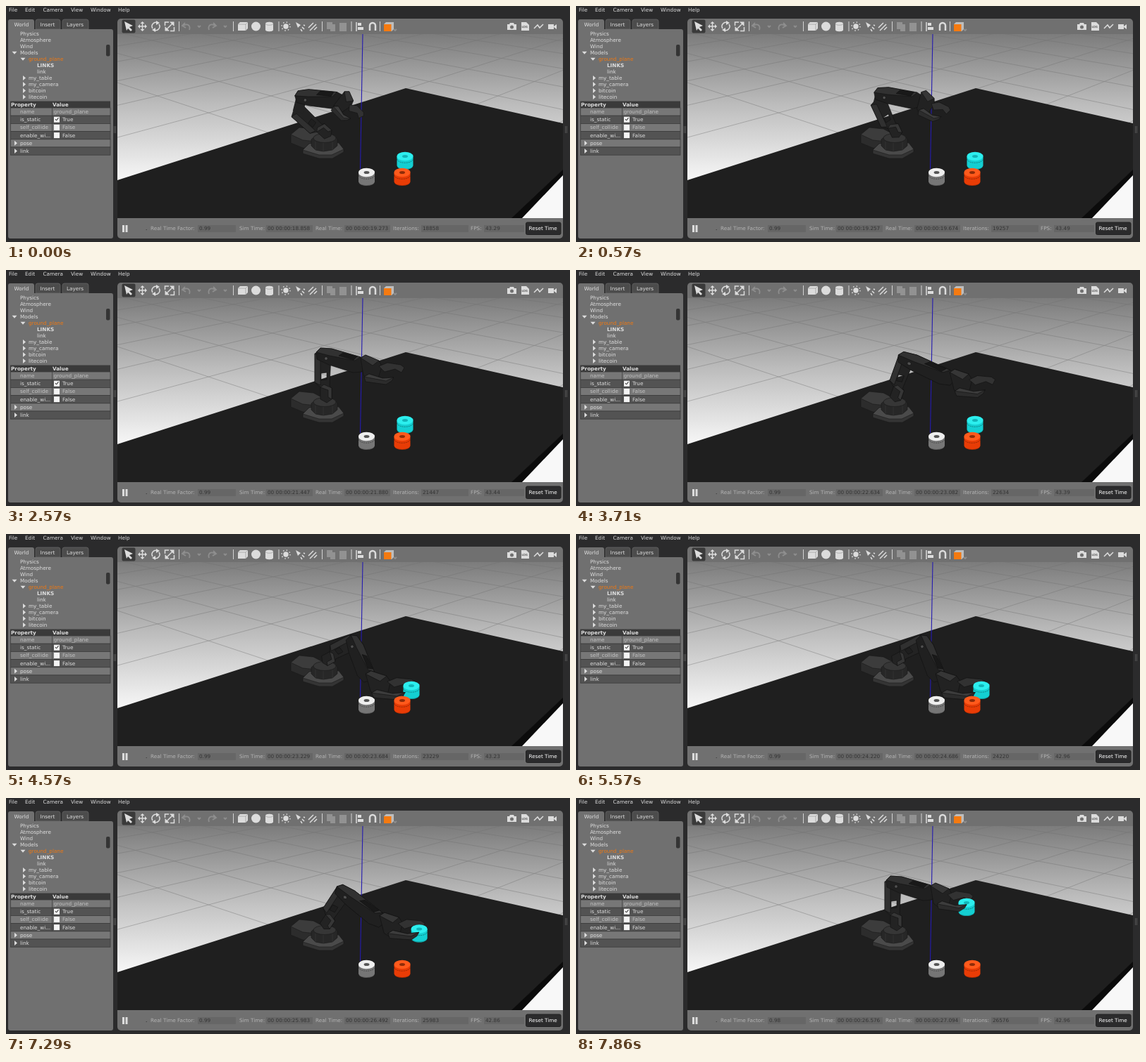
An HTML page that plays this animation: 800 by 336 pixels, repeating every 8000 ms.

```html
<!DOCTYPE html>
<html lang="en">
<head>
<meta charset="utf-8">
<title>Robot arm simulation</title>
<style>
html, body { margin: 0; width: 100%; height: 100%; overflow: hidden; background: #2b2b2c; }
svg { display: block; width: 100%; height: 100%; }
text { font: 7.25px "DejaVu Sans", sans-serif; fill: #dedede; white-space: pre; }
.bold { font-weight: bold; }
.orange { fill: #ee7812; }
.black { fill: #151515; }
.dim { fill: #b4b4b4; }
.faint { fill: #c2c2c2; }
.value { fill: #343434; }
.icon { fill: #dcdcdc; }
.line { fill: none; stroke: #dcdcdc; stroke-width: 1.5; }
.muted { fill: none; stroke: #8e8e8e; stroke-width: 1.8; }
</style>
</head>
<body>
<svg viewBox="0 0 800 336" preserveAspectRatio="none">
  <defs>
    <linearGradient id="ground" x1="0" y1="0" x2="0" y2="1">
      <stop offset="0" stop-color="#7c7c7c"/>
      <stop offset=".38" stop-color="#bcbcbc"/>
      <stop offset=".78" stop-color="#f5f5f5"/>
      <stop offset="1" stop-color="#fff"/>
    </linearGradient>
    <clipPath id="view"><path d="M158 40H790V302H158Z"/></clipPath>
    <g id="coin">
      <path d="M-11.5-6V7C-11 15 11 15 11.5 7V-6Z"/>
      <path d="M-11.5-2C-10 5 10 5 11.5-2" fill="none" stroke="#000" stroke-opacity=".35" stroke-dasharray="2 1"/>
      <path d="M-11.5 8C-10 14 10 14 11.5 8" fill="none" stroke="#000" stroke-opacity=".25"/>
    </g>
    <path id="chevron" class="muted" d="M-2-1L0 1L2-1"/>
  </defs>

  <g id="menu"></g>
  <path d="M42 33V22q0-3 3-3H74q3 0 3 3V33ZM80 33V22q0-3 3-3H114q3 0 3 3V33Z" fill="#4c4c4c" stroke="#696969" stroke-width=".7"/>
  <path d="M3 33V22q0-3 3-3H37q3 0 3 3V33H149q3 0 3 3V328q0 3-3 3H6q-3 0-3-3Z" fill="#707070"/>
  <rect x="142" y="55" width="5.5" height="16.500" rx="2" fill="#343434"/>
  <g id="rows"></g>
  <g id="labels"></g>

  <rect x="158" y="18" width="632" height="313" rx="5" fill="#707070"/>
  <g id="toolbar">
    <rect x="164.500" y="19.500" width="19" height="19" rx="2" fill="#3a3a3a"/>
    <path class="icon" d="M168 22L180 28L175 30L179 34L177 36L173 32L171 35Z"/>
    <path class="line" d="M188 29H199M193.500 23V35"/>
    <path class="icon" d="M193.500 22l3 3h-6ZM193.500 36l3-3h-6ZM187 29l3-3v6ZM200 29l-3-3v6Z"/>
    <path class="line" d="M208 32A5.500 5.500 0 0 1 215 24M217 26A5.500 5.500 0 0 1 210 34"/>
    <path class="icon" d="M213 21l5 3l-5 3ZM212 37l-5-3l5-3Z"/>
    <path class="line" d="M225.500 28V23H231M238.500 30V35.500H233M228 33L236 25"/>
    <path class="icon" d="M232 22.500h6.500v6.500ZM225.500 29v6.500h6.500Z"/>
    <path class="muted" d="M251 28C258 24 262 28 260 34M254 24L250 28L255 31M297 28C290 24 286 28 288 34M294 24L298 28L293 31"/>
    <use href="#chevron" x="274" y="29"/><use href="#chevron" x="311" y="29"/>
    <path d="M245.500 22V36M322.500 22V36M387 22V36M448.500 22V36M490 22V36M530.500 22V36" stroke="#d2d2d2"/>
    <path class="icon" d="M329 26l3-3h11v9l-3 3H329Z"/>
    <path d="M329 26H340V35M340 26l3-3" fill="none" stroke="#999" stroke-width=".7"/>
    <circle class="icon" cx="354.500" cy="29" r="6.500"/>
    <path class="icon" d="M368 25C368 22 379 22 379 25V34C379 37 368 37 368 34Z"/>
    <path d="M368 25C368 28 379 28 379 25" fill="none" stroke="#999" stroke-width=".7"/>
    <circle class="icon" cx="397" cy="29" r="3.700"/>
    <circle class="line" cx="397" cy="29" r="6" stroke-dasharray="1.500 3.200"/>
    <path class="icon" d="M411 23l7 4l-4 4Z"/>
    <path class="line" d="M418 33l2 3M420 30l3 3M422 27l2 1"/>
    <path class="line" d="M429 31L436 24M431 35L440 26M437 34L441 30"/>
    <path d="M455 23H463V33H455ZM460 26H467V36H460ZM473 24H483V36H473Z" fill="#929292"/>
    <path class="line" d="M497 23V36"/><path class="icon" d="M499 24h5v4h-5ZM499 30h8v4h-8Z"/>
    <path class="line" d="M516 35V28A4 4 0 0 1 524 28V35" style="stroke-width:2.500"/>
    <path d="M536 26l3-3H550V33l-3 3H536Z" fill="#bdbdbd"/>
    <rect x="536" y="26" width="10.500" height="10" fill="#f57a10"/>
    <use href="#chevron" x="552" y="34"/>
    <path class="icon" d="M711 26h3l1-2h5l1 2h3v8H711Z"/><circle cx="717.500" cy="30" r="2.500" fill="#707070"/>
    <path class="icon" d="M731 23H738L742 27V35H731Z"/>
    <text x="731.500" y="31" class="black" style="font-size:4px">LOG</text>
    <path class="line" d="M749 32L754 27L757 31L762 26"/>
    <path class="icon" d="M769 26h8v7h-8ZM777 29l4-3v7l-4-3Z"/>
  </g>

  <g clip-path="url(#view)">
    <rect x="158" y="40" width="632" height="262" fill="url(#ground)"/>
    <path id="grid" stroke="#707070" stroke-width=".7" opacity=".6"/>
    <path d="M790 233V302H717Z" fill="#f8f8f8"/>
    <path d="M158 248L567 117L790 167V234L718 302H158Z" fill="#1f1f1f"/>
    <path d="M790 233L717 302H732L790 241Z" fill="#0b0b0b"/>

    <g id="base" stroke="#1a1a1a" stroke-width=".6">
      <path d="M404 183L416 173L436 175L453 184L446 203L421 202L404 195Z" fill="#2c2c2c"/>
      <path d="M404 183L416 173L436 175L453 184L440 193L421 191Z" fill="#3c3c3c"/>
      <path d="M421 205L430 196L453 192L472 195L479 204V208L463 217H444L421 210Z" fill="#343434"/>
      <path d="M421 205L430 196L453 192L472 195L479 204L462 212H444Z" fill="#4a4a4a"/>
      <path d="M433 190L440 184H464L470 189V199L463 205L450 207L439 205L433 199Z" fill="#272727"/>
      <path d="M439 193V205M450 195V207M463 193V205" stroke="#3a3a3a"/>
      <ellipse cx="452" cy="188" rx="16" ry="6.500" fill="#363636"/>
    </g>

    <path d="M506 40L502.500 232" stroke="#251bb0" stroke-width="1.100"/>
    <use href="#coin" x="511.500" y="243" fill="#767676"/>
    <ellipse cx="511.500" cy="237" rx="11.500" ry="6.200" fill="#eee"/>
    <ellipse cx="511.500" cy="237" rx="4" ry="2" fill="#555"/>

    <g stroke="#111" stroke-width=".6">
      <g id="upper">
        <path d="M438 119L446 115L461 123L459 165L462 168V184L455 189L446 184V167L438 160ZM447 147V157L455 156V146Z" fill="#232323" fill-rule="evenodd"/>
        <path d="M438 119L446 122V164L438 160Z" fill="#303030"/>
        <path d="M446 167L451 163L462 168V184L457 181V171Z" fill="#363636"/>
      </g>
      <path id="elbow" stroke="#232323" stroke-width="15"/>
      <g id="fore">
        <path d="M440 117L446 111L462 112L503 124L512 131L505 145L492 146L458 135L441 127Z" fill="#202020"/>
        <path d="M440 117L446 111L462 112L503 124L495 129L459 122Z" fill="#313131"/>
        <path d="M472 122L478 118L498 123L493 128Z" fill="#191919"/>
        <circle cx="454" cy="126" r="2.300" fill="#505050"/>
      </g>
      <g id="wrist">
        <path d="M503 125L510 121L529 129L533 137L528 154L516 157L507 150Z" fill="#222"/>
        <path d="M503 125L510 121L529 129L520 136Z" fill="#363636"/>
        <path id="backJaw" d="M526 138L538 133L557 136L562 140L558 147L549 142L534 146Z" fill="#323232"/>
      </g>
    </g>

    <g id="cyan">
      <use href="#coin" fill="#14cfd2"/>
      <ellipse cy="-6" rx="11.500" ry="6.200" fill="#2ceeee"/>
      <ellipse cy="-6" rx="4" ry="2" fill="#12b4b8"/>
    </g>
    <g id="hand" stroke="#111" stroke-width=".6">
      <g id="frontJaw">
        <path d="M515 150L522 146L541 152L557 151L554 156L546 161L517 157Z" fill="#2c2c2c"/>
        <path d="M515 150L522 146L541 152L557 151L546 156Z" fill="#3c3c3c"/>
      </g>
    </g>
    <use href="#coin" x="562" y="243" fill="#e83c06"/>
    <ellipse cx="562" cy="237" rx="11.500" ry="6.200" fill="#ff5a1c"/>
    <ellipse cx="562" cy="237" rx="4" ry="2" fill="#8f2c08"/>
  </g>

  <path class="icon" d="M165 312H168V322H165ZM169.500 312H172.500V322H169.500Z"/>
  <path d="M272 312H326V322H272ZM369 312H435V322H369ZM480 312H545V322H480ZM589 312H656V322H589ZM678 312H735V322H678Z" fill="#666"/>
  <g id="status"></g>
  <rect x="737.500" y="308" width="49.500" height="17.500" rx="2" fill="#2b2b2c" stroke="#222"/>
  <text x="741.500" y="319.300" style="fill:#fff">Reset Time</text>
  <path d="M153.500 171V181M155.500 171V181M793.500 171V181M795.500 171V181" stroke="#666" stroke-width=".7"/>
</svg>
<script>
const $ = id => document.getElementById(id);
const SVG = "http://www.w3.org/2000/svg";

function add(parent, tag, attrs, content = "") {
  const el = document.createElementNS(SVG, tag);
  for (const name in attrs) el.setAttribute(name, attrs[name]);
  el.textContent = content;
  return $(parent).appendChild(el);
}
const label = (parent, x, y, content, cls = "") => add(parent, "text", { x, y, class: cls }, content);

// Menus, tabs and tree
[[4, "File"], [27, "Edit"], [52.5, "Camera"], [92, "View"], [120, "Window"], [159, "Help"]]
  .forEach(([x, name]) => label("menu", x, 8, name));
[[11.5, "World"], [48.5, "Insert"], [86, "Layers"]].forEach(([x, name]) => label("labels", x, 28.5, name));

function arrow(x, y, open) {
  add("labels", "path", { class: "icon", d: open ? `M${x - 3.5} ${y - 2}h7l-3.5 4Z` : `M${x - 2} ${y - 3.5}v7l4-3.5Z` });
}
[[20, "Physics"], [20, "Atmosphere"], [20, "Wind"], [20, "Models"], [32, "ground_plane", "orange"],
 [44, "LINKS", "bold"], [44, "link"], [32, "my_table"], [32, "my_camera"], [32, "bitcoin"], [32, "litecoin"]]
  .forEach(([x, name, cls], i) => {
    const y = 42.3 + i * 8.98;
    label("labels", x, y, name, cls);
    if (i === 3 || i === 4) arrow(x - 8, y - 2.5, true);
    if (i > 6) arrow(x - 6, y - 2.7, false);
  });

// Property table
add("rows", "rect", { x: 6, y: 135.5, width: 142, height: 9.5, fill: "#3a3a3a" });
label("labels", 7, 143, "Property", "bold");
label("labels", 66, 143, "Value", "bold");
[["name", "ground_plane", "faint"], ["is_static", "True"], ["self_collide", "False", "faint"],
 ["enable_wi...", "False"], ["pose"], ["link"]].forEach(([name, value, cls], i) => {
  const y = 145 + i * 11.2, fill = i % 2 ? "#535353" : "#777";
  add("rows", "rect", { x: 6.5, y, width: 141.5, height: 11.2, fill, stroke: "#3c3c3c", "stroke-width": 0.8 });
  label("labels", 20, y + 8, name, cls);
  if (!value) return arrow(14, y + 5.5, false);
  if (i) add("labels", "rect", { x: 68, y: y + 1.5, width: 8, height: 8, fill: "#f4f4f4" });
  label("labels", i ? 80 : 67.5, y + 8, value, cls);
});
add("labels", "path", { d: "M70 161l1.500 2l3-4", fill: "none", stroke: "#111" });
add("labels", "path", { d: "M65.500 145V190", stroke: "#3c3c3c", "stroke-width": 0.7 });

// Ground grid: two fans of lines, evenly spaced along the top edge
const fan = (vx, vy, first, count) => Array.from({ length: count }, (_, i) => {
  const x = first + i * 110;
  return `M${vx} ${vy}L${vx + (x - vx) * 4} ${vy + (40 - vy) * 4}`;
}).join("");
$("grid").setAttribute("d", fan(1400, -150, 260, 9) + fan(-622, -150, -50, 9));

// Status bar
[[205, "Real Time Factor:"], [331, "Sim Time:"], [439, "Real Time:"], [549, "Iterations:"], [659, "FPS:"]]
  .forEach(([x, name]) => label("status", x, 319.3, name, "dim"));
label("status", 198, 319.3, ".", "black");
const [factor, simTime, realTime, iterations, fps] =
  [274, 371, 482, 591, 680].map(x => label("status", x, 319.3, "", "value"));

// Linear interpolation over rows of [position, ...values]
function sample(rows, at) {
  let i = 1;
  while (i < rows.length - 1 && at > rows[i][0]) i++;
  const a = rows[i - 1], b = rows[i];
  const p = Math.min(1, Math.max(0, (at - a[0]) / (b[0] - a[0])));
  return a.slice(1).map((v, k) => v + (b[k + 1] - v) * p);
}

// Each pose: elbow, root of the forearm, wrist, fingertip
const SHOULDER = [455, 180], ELBOW = [449, 122], WRIST = [510, 134], TIP = [560, 147];
const folded = [414, 151, 419, 131, 478, 131, 499, 160];
const upright = [...ELBOW, ...ELBOW, ...WRIST, ...TIP];
const leaning = [467, 128, 467, 128, 538, 154, 590, 164];
const lowering = [481, 138, 481, 138, 538, 185, 592, 195];
const reaching = [491, 154, 491, 154, 519, 208, 577, 219];
const armKeys = [
  [140, ...folded], [1140, ...upright], [3290, ...upright], [3710, ...leaning],
  [4150, ...lowering], [4570, ...reaching], [6900, ...reaching],
  [7200, ...lowering], [7500, ...leaning], [7800, ...upright]
];
const gripKeys = [[140, 1], [1140, 0], [1500, 0], [2000, 1], [5800, 1], [6300, 0.4]];
const coinKeys = [
  [4430, 566, 220], [4570, 575, 222], [5900, 575, 222], [6300, 577, 219],
  [6900, 577, 219], [7200, 587, 201], [7500, 584, 171], [7800, 554, 155]
];
// refresh count, simulated ms, real ms, fps
const counterKeys = [
  [0, 18858, 19273, 43.29], [6, 20054, 20477, 43.88], [13, 21447, 21880, 43.44], [19, 22634, 23082, 43.39],
  [27, 24220, 24686, 42.96], [34, 25587, 26091, 42.79], [39, 26576, 27094, 42.96]
];
const refreshKeys = [[0, 0], [1285, 6], [2571, 13], [3714, 19], [5571, 27], [6857, 34], [7857, 39]];

// Moves a limb drawn along home segment a-b onto segment c-d
function place(ids, a, b, c, d) {
  const angle = (p, q) => Math.atan2(q[1] - p[1], q[0] - p[0]) * 180 / Math.PI;
  const size = (p, q) => Math.hypot(q[0] - p[0], q[1] - p[1]);
  const move = `translate(${c}) rotate(${angle(c, d)}) scale(${size(c, d) / size(a, b)} 1) ` +
    `rotate(${-angle(a, b)}) translate(${-a[0]} ${-a[1]})`;
  ids.forEach(id => $(id).setAttribute("transform", move));
}

const clock = ms => "00 00:00:" + (Math.round(ms) / 1000).toFixed(3);

function draw(t) {
  const pose = sample(armKeys, t);
  const [elbow, root, wrist, tip] = [0, 2, 4, 6].map(i => pose.slice(i, i + 2));
  place(["upper"], SHOULDER, ELBOW, SHOULDER, elbow);
  $("elbow").setAttribute("d", `M${elbow}L${root}`);
  place(["fore"], ELBOW, WRIST, root, wrist);
  place(["wrist", "hand"], WRIST, TIP, wrist, tip);
  const [grip] = sample(gripKeys, t);
  $("backJaw").setAttribute("transform", `translate(${3 * grip} ${-grip})`);
  $("frontJaw").setAttribute("transform", `translate(${-7 * grip} ${2 * grip})`);
  $("cyan").setAttribute("transform", `translate(${sample(coinKeys, t)})`);

  const refresh = Math.floor(sample(refreshKeys, t)[0] + 0.01);
  const [sim, real, rate] = sample(counterKeys, refresh);
  factor.textContent = refresh > 36 ? "0.98" : "0.99";
  simTime.textContent = clock(sim);
  realTime.textContent = clock(real);
  iterations.textContent = Math.round(sim);
  fps.textContent = rate.toFixed(2);
}

const LOOP = 8000, STEP = LOOP / 56;
const start = performance.now();
function tick() {
  const t = (performance.now() - start) % LOOP;
  draw(Math.floor((t + 5) / STEP) % 56 * STEP);
  requestAnimationFrame(tick);
}
tick();
</script>
</body>
</html>
```
